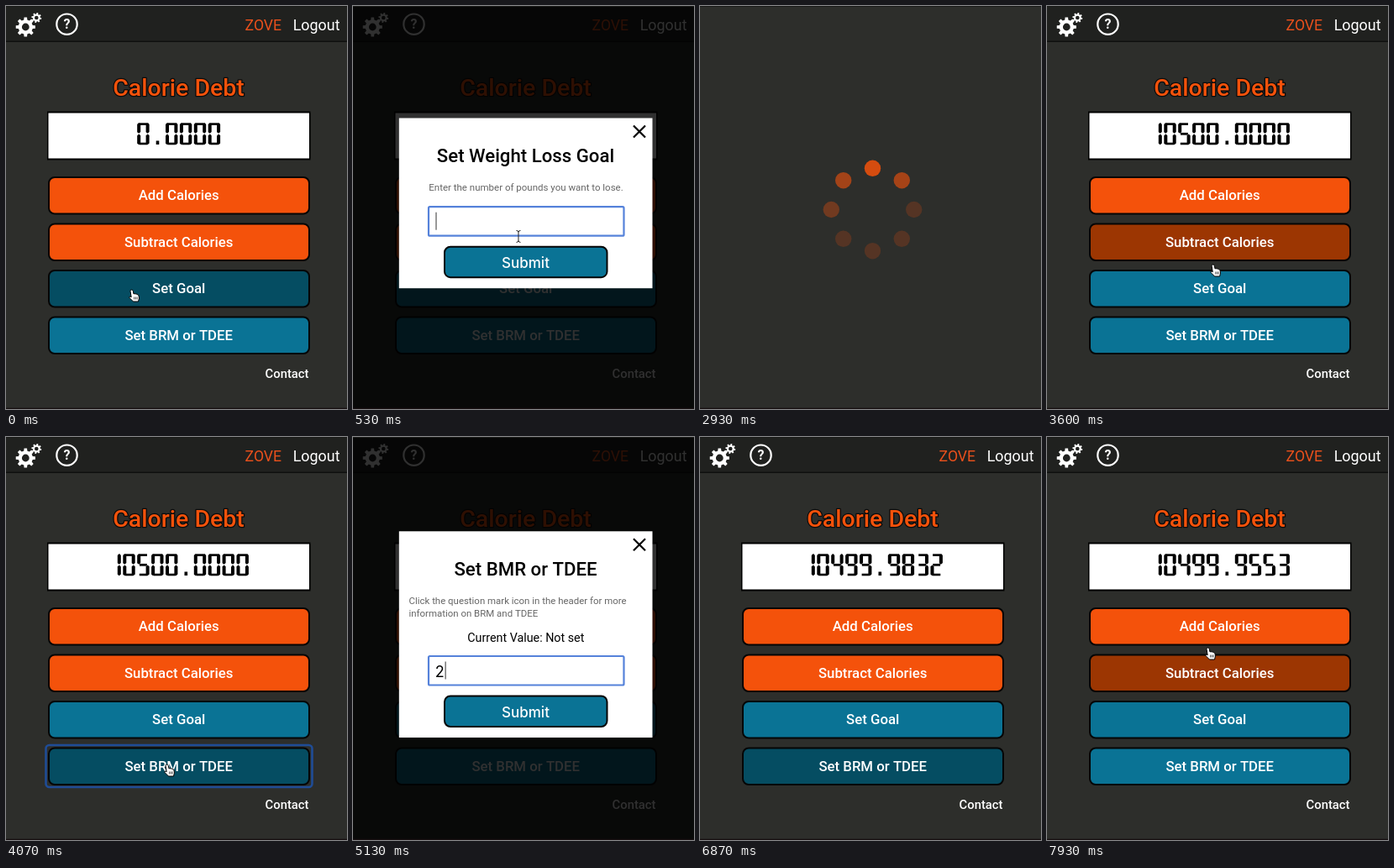
Animation, 406 px wide and 480 px high, one loop 8000 ms. Source, as an HTML page with a canvas:

```html
<!DOCTYPE html>
<html lang="en">
<head>
<meta charset="utf-8">
<title>Calorie Debt</title>
<style>
html, body { margin: 0; width: 100%; height: 100%; overflow: hidden; background: #2d2e2b; }
canvas { display: block; width: 406px; height: 480px; }
</style>
</head>
<body>
<canvas id="stage" width="406" height="480"></canvas>
<script>
const ctx = document.getElementById('stage').getContext('2d');
const LOOP = 8000;
const BG = '#2d2e2b', ORANGE = '#f4520b', TEAL = '#0a7395', DARK_TEAL = '#054d62', DARK_ORANGE = '#9c3602';
const UI = 'Roboto, "Open Sans", sans-serif';
const SYS = 'Inter, "Liberation Sans", sans-serif';

const within = (t, a, b) => t >= a && t < b;

function rect(x, y, w, h, fill) {
  ctx.fillStyle = fill;
  ctx.fillRect(x, y, w, h);
}

function rounded(x, y, w, h, r, fill, stroke, line) {
  ctx.beginPath();
  ctx.roundRect(x, y, w, h, r);
  if (fill) { ctx.fillStyle = fill; ctx.fill(); }
  if (stroke) { ctx.strokeStyle = stroke; ctx.lineWidth = line; ctx.stroke(); }
}

function text(str, x, y, size, color, align = 'center', weight = 500, family = UI) {
  ctx.font = `${weight} ${size}px ${family}`;
  ctx.textAlign = align;
  ctx.fillStyle = color;
  ctx.fillText(str, x, y);
}

// ---- pointer ----
const MOVES = [
  [200, 150, 338], [600, 201, 269],
  [3400, 201, 269], [3930, 192, 390],
  [7070, 192, 390], [7530, 191, 302],
  [7670, 191, 302], [7930, 192, 251]
];

function pointerAt(t) {
  const i = MOVES.findIndex(m => m[0] > t);
  if (i === 0) return MOVES[0].slice(1);
  if (i < 0) return MOVES[MOVES.length - 1].slice(1);
  const [t0, x0, y0] = MOVES[i - 1], [t1, x1, y1] = MOVES[i];
  const p = (t - t0) / (t1 - t0), e = p * p * (3 - 2 * p);
  return [x0 + (x1 - x0) * e, y0 + (y1 - y0) * e];
}

const HAND = new Path2D('M-2 1.6Q-2 0-.5 0Q1 0 1.3 1.6L2 5Q3 4 4 5Q5.2 4.3 6 5.6Q7.5 5.2 8 7L8.5 10L7.5 14L1.5 14L-3 9.5Q-3.5 7.6-1.6 8.2L-.8 8.8Z');
const ARROW = new Path2D('M0 0L0 12.5L3 9.8L5 14L7 13.2L5 9.2L9 9Z');
const IBEAM = new Path2D('M-2.5-7Q0-7 0-5L0 5Q0 7-2.5 7M2.5-7Q0-7 0-5M0 5Q0 7 2.5 7');

function pointer(kind, x, y) {
  ctx.save();
  ctx.translate(x, y);
  ctx.lineWidth = 1;
  ctx.lineJoin = 'round';
  if (kind === 'ibeam') {
    ctx.strokeStyle = '#222';
    ctx.stroke(IBEAM);
  } else {
    const hand = kind === 'hand', shape = hand ? HAND : ARROW;
    ctx.fillStyle = hand ? '#fff' : '#000';
    ctx.strokeStyle = hand ? '#000' : '#fff';
    ctx.fill(shape);
    ctx.stroke(shape);
    if (hand) {
      ctx.beginPath();
      for (const dx of [2.6, 4.4, 6.2]) { ctx.moveTo(dx, 8.5); ctx.lineTo(dx, 11.5); }
      ctx.lineWidth = .7;
      ctx.stroke();
    }
  }
  ctx.restore();
}

// ---- header icons ----
function gear(x, y, r, teeth, hole, turn) {
  const step = Math.PI * 2 / teeth;
  ctx.beginPath();
  for (let i = 0; i < teeth; i++) {
    const a = i * step + turn;
    for (const [k, q] of [[-.3, .74], [-.19, 1], [.19, 1], [.3, .74]])
      ctx.lineTo(x + Math.cos(a + k * step) * r * q, y + Math.sin(a + k * step) * r * q);
  }
  ctx.closePath();
  ctx.moveTo(x + hole, y);
  ctx.arc(x, y, hole, 0, Math.PI * 2);
  ctx.fillStyle = '#fff';
  ctx.fill('evenodd');
}

function header() {
  rect(0, 1, 406, 41, '#20211f');
  rect(0, 41.5, 406, 1.5, '#0f100f');
  gear(23.3, 25, 11.7, 8, 4.4, 0);
  gear(36.3, 14, 6, 8, 2.3, .2);
  ctx.beginPath();
  ctx.arc(72.5, 21.7, 12.2, 0, Math.PI * 2);
  ctx.strokeStyle = '#fff';
  ctx.lineWidth = 2.2;
  ctx.stroke();
  text('?', 72.5, 27.3, 16, '#fff', 'center', 700);
  text('ZOVE', 328, 28.5, 17.6, '#e9501c', 'right', 400);
  text('Logout', 397.5, 28.5, 17.9, '#fff', 'right', 400);
}

// ---- seven segment display ----
const SEGMENTS = ['abcdef', 'bc', 'abged', 'abgcd', 'fgbc', 'afgcd', 'afgedc', 'abc', 'abcdefg', 'abcdfg'];
const CELL = 16.9, DW = 14.4, DH = 26;

function upright(x, y, h) {
  ctx.moveTo(x, y + 1.6);
  for (const [dx, dy] of [[1.6, 0], [2.6, 0], [4, 1.8], [4, h - 1.8], [2, h], [0, h - 1.6]])
    ctx.lineTo(x + dx, y + dy);
  ctx.closePath();
}

function digit(n, x, y) {
  const half = DH / 2 - .5, right = x + DW - 4;
  const parts = {
    a: () => ctx.rect(x + 2.6, y, DW - 5.2, 2.6),
    d: () => ctx.rect(x + 2.6, y + DH - 2.6, DW - 5.2, 2.6),
    g: () => ctx.rect(x + 2.8, y + DH / 2 - 1.4, DW - 5.6, 2.8),
    f: () => upright(x, y, half),
    b: () => upright(right, y, half),
    e: () => upright(x, y + DH - half, half),
    c: () => upright(right, y + DH - half, half)
  };
  for (const s of SEGMENTS[n]) {
    ctx.beginPath();
    parts[s]();
    ctx.fill();
  }
}

const TICKS = [6470, 6670, 6870, 7070, 7200, 7330, 7470, 7670, 7870];

function debt(t) {
  if (t < 2930) return '0.0000';
  if (t < 6130) return '10500.0000';
  const n = TICKS.filter(k => t >= k).length;
  return (10499.9971 - n * .004645).toFixed(4);
}

function display(value) {
  rect(49, 125.5, 313.5, 58, '#000');
  rect(50.5, 127.5, 310.5, 54, '#fff');
  ctx.fillStyle = '#000';
  let x = 205.7 - value.length * CELL / 2;
  for (const ch of value) {
    if (ch === '.') ctx.fillRect(x + 6.8, 160.5, 3.6, 4.5);
    else digit(+ch, x + 1.2, 139.3);
    x += CELL;
  }
}

// ---- page ----
const BUTTONS = [
  ['Add Calories', 203, ORANGE, DARK_ORANGE],
  ['Subtract Calories', 258.5, ORANGE, DARK_ORANGE],
  ['Set Goal', 314, TEAL, DARK_TEAL],
  ['Set BRM or TDEE', 369.5, TEAL, DARK_TEAL]
];

function page(t, modal) {
  header();
  ctx.font = `500 28.5px ${UI}`;
  ctx.textAlign = 'center';
  ctx.lineJoin = 'round';
  ctx.lineWidth = 2.6;
  ctx.strokeStyle = '#0c0c0c';
  ctx.strokeText('Calorie Debt', 205.5, 106.5);
  text('Calorie Debt', 205.5, 106.5, 28.5, ORANGE);
  display(debt(t));
  const hoverY = modal ? -1 : pointerAt(t - 70)[1];
  const focus = within(t, 70, 200) ? 2 : within(t, 3990, 4130) ? 3 : -1;
  BUTTONS.forEach(([label, y, color, dark], i) => {
    if (i === focus) rounded(47.5, y - 2.5, 317, 50, 4, null, '#1f4c96', 2.6);
    const hover = within(hoverY, y, y + 45);
    rounded(51, y + 1, 310, 43.5, 7, hover ? dark : color, '#050505', 2);
    text(label, 205.7, y + 28.3, 16.8, '#fff');
  });
  text('Contact', 360.5, 443, 14.8, '#fff', 'right');
}

// ---- dialogs ----
function dialog(top, height, title, typed, caret, hover) {
  rect(0, 1, 406, 479, 'rgba(0,0,0,.81)');
  rect(54.8, top, 301.7, height, '#fff');
  ctx.beginPath();
  ctx.moveTo(334, top + 9); ctx.lineTo(348, top + 23);
  ctx.moveTo(348, top + 9); ctx.lineTo(334, top + 23);
  ctx.strokeStyle = '#000';
  ctx.lineWidth = 2.2;
  ctx.stroke();
  text(title, 205.5, top + 52.7, 22.2, '#000');

  const y = top + height - 97;
  rounded(90, y, 232.5, 34.5, 1.5, '#fff', '#5582da', 2.2);
  text(typed, 97.8, y + 24.7, 18, '#000', 'left', 400, SYS);
  if (caret) rect(98.5 + typed.length * 11.12, y + 6.5, 1, 21, '#333');
  rounded(109, y + 47.5, 193.5, 36.5, 7, hover ? DARK_TEAL : TEAL, '#050505', 2);
  text('Submit', 205.5, y + 72.5, 17, '#fff', 'center', 500, SYS);
}

function goalDialog(t, py) {
  const caret = !within(t, 730, 1200) && !within(t, 2200, 2670);
  dialog(133.5, 202.7, 'Set Weight Loss Goal', t < 1670 ? '' : '3', caret, within(py, 287, 325));
  text('Enter the number of pounds you want to lose.', 206, 220, 11.5, '#666', 'center', 400);
}

function rateDialog(t) {
  const count = [5130, 5270, 5470, 5670].filter(k => t >= k).length;
  dialog(112.3, 245.7, 'Set BMR or TDEE', '2000'.slice(0, count), !within(t, 4600, 5130), false);
  text('Click the question mark icon in the header for more', 66.5, 199, 11.45, '#666', 'left', 400);
  text('information on BRM and TDEE', 66.5, 213.5, 11.45, '#666', 'left', 400);
  text('Current Value: Not set', 205.8, 244, 14.3, '#000', 'center', 400);
}

// ---- loader ----
const GLOW = [1, .2, .2, .2, .2, .2, .5, .7];

function loader(elapsed) {
  const phase = (elapsed + 70) / 137.5, k = Math.floor(phase), f = phase - k;
  for (let i = 0; i < 8; i++) {
    const now = GLOW[(i - k + 16) % 8], next = GLOW[(i - k + 15) % 8];
    const a = i * Math.PI / 4;
    ctx.globalAlpha = now + (next - now) * f;
    ctx.beginPath();
    ctx.arc(205.5 + Math.sin(a) * 49.2, 242.5 - Math.cos(a) * 49.2, 9.7, 0, Math.PI * 2);
    ctx.fillStyle = ORANGE;
    ctx.fill();
  }
  ctx.globalAlpha = 1;
}

function draw(t) {
  rect(0, 0, 406, 480, BG);
  const wait = within(t, 2930, 3130) ? 2930 : within(t, 6130, 6330) ? 6130 : 0;
  if (wait) {
    loader(t - wait);
  } else {
    const goal = within(t, 200, 2930), rate = within(t, 4130, 6130);
    const [x, y] = pointerAt(t);
    page(t, goal || rate);
    if (goal) goalDialog(t, y);
    if (rate) rateDialog(t);
    if (!within(t, 1670, 3400) && !within(t, 5130, 7070)) {
      let kind = 'hand';
      if (goal && !within(y, 287, 325)) kind = y < 276 ? 'ibeam' : 'arrow';
      if (rate && t >= 4270) kind = 'arrow';
      pointer(kind, x, y);
    }
  }
  rect(0, 0, 406, 1, '#191a18');
  rect(0, 478.7, 406, 1.3, '#160f10');
}

const start = performance.now();
function frame() {
  draw((performance.now() - start) % LOOP);
  requestAnimationFrame(frame);
}
frame();
</script>
</body>
</html>
```
